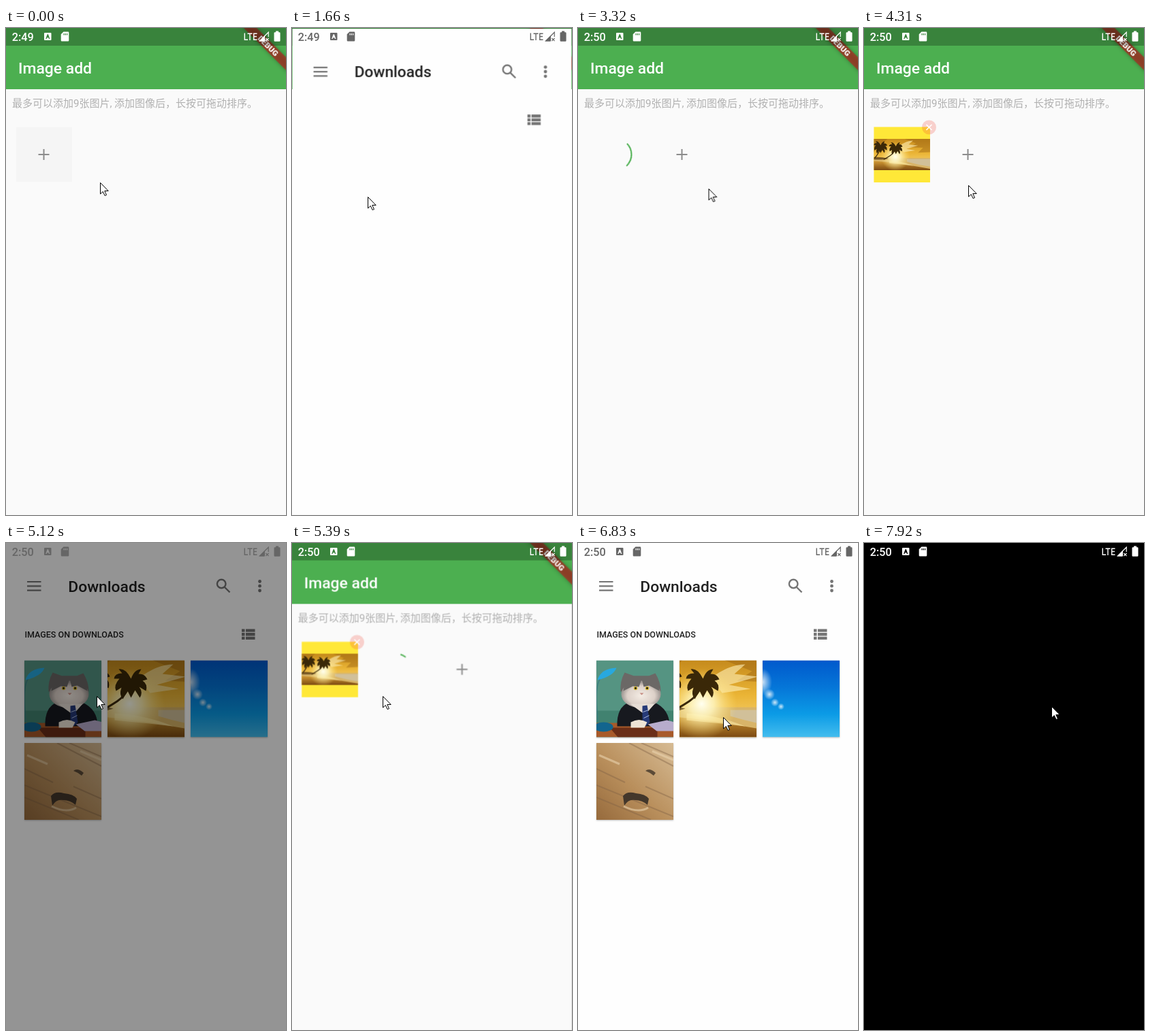
Write an HTML page that moves like this. It is 411x716 px and loops after 8000 ms.

```html
<!DOCTYPE html>
<html lang="zh">
<head>
<meta charset="utf-8">
<title>Image add</title>
<style>
  html, body { margin: 0; width: 100%; height: 100%; overflow: hidden; background: #000; }
  svg#stage { display: block; width: 411px; height: 716px; }
  text { font-family: Roboto, "Noto Sans CJK SC", "Noto Sans CJK", sans-serif; }
  .medium { font-weight: 500; }
  #home, #picker { transform-origin: 205.5px 358px; }
  .line { fill: none; stroke: currentColor; }
  #ribbon { filter: drop-shadow(0 0 3px rgba(0, 0, 0, .45)); }
  .thumb { filter: drop-shadow(0 1px 1px rgba(0, 0, 0, .25)); }
</style>
</head>
<body>
<svg id="stage" viewBox="0 0 411 716">
  <defs>
    <linearGradient id="dusk" x1="0" y1="0" x2="0" y2="1">
      <stop offset="0" stop-color="#c58a1c"/><stop offset=".45" stop-color="#eab435"/><stop offset="1" stop-color="#f9dd8a"/>
    </linearGradient>
    <linearGradient id="beach" x1="0" y1="0" x2="0" y2="1">
      <stop offset="0" stop-color="#d29a34"/><stop offset="1" stop-color="#7c4a12"/>
    </linearGradient>
    <radialGradient id="glow">
      <stop offset="0" stop-color="#fffff0"/><stop offset=".35" stop-color="#fff6c0" stop-opacity=".85"/>
      <stop offset="1" stop-color="#ffe070" stop-opacity="0"/>
    </radialGradient>
    <linearGradient id="sky" x1="0" y1="0" x2="0" y2="1">
      <stop offset="0" stop-color="#0059cc"/><stop offset=".35" stop-color="#0576d8"/>
      <stop offset=".7" stop-color="#0b9be6"/><stop offset="1" stop-color="#44bdee"/>
    </linearGradient>
    <radialGradient id="cloud">
      <stop offset="0" stop-color="#fff" stop-opacity=".8"/><stop offset="1" stop-color="#fff" stop-opacity="0"/>
    </radialGradient>
    <radialGradient id="fur" cy=".55">
      <stop offset="0" stop-color="#f4ece4"/><stop offset=".7" stop-color="#dcd0c8"/><stop offset="1" stop-color="#9d9692"/>
    </radialGradient>
    <linearGradient id="sand" x1="0" y1="1" x2="1" y2="0">
      <stop offset="0" stop-color="#966a3c"/><stop offset=".45" stop-color="#b98f5c"/><stop offset="1" stop-color="#d6bb94"/>
    </linearGradient>

    <path id="crown" fill="#3a2808" d="M0-6Q-8-22-18-20L-13-14Q-24-14-25-6L-17-6Q-26 4-22 12L-14 7Q-18 18-12 24L-5 12 0 22 6 11 13 22Q18 14 12 6L22 12Q25 2 17-3L24-5Q20-14 11-13L15-20Q5-20 0-6Z"/>
    <symbol id="palm" viewBox="0 0 204 113" preserveAspectRatio="xMidYMid slice">
      <path fill="url(#dusk)" d="M0 0H204V113H0Z"/>
      <path fill="#9a6312" opacity=".45" d="M0 0H50L12 30 0 50ZM112 0H204V48L160 50 178 32 130 30 152 16Z"/>
      <path fill="#fff0b8" opacity=".6" d="M92 26Q118 6 142 6L126 20 160 24 118 36 150 42 108 48Z"/>
      <path fill="#d8b468" d="M0 69H204V113H0Z"/>
      <path fill="#cfc6ae" opacity=".7" d="M120 73H204V100Q160 94 120 82Z"/>
      <path fill="url(#beach)" d="M0 80Q60 84 110 92T204 108V113H0Z"/>
      <path fill="#fbe6a4" opacity=".6" d="M56 78Q100 80 142 97 100 92 56 88Z"/>
      <circle cx="78" cy="64" r="52" fill="url(#glow)"/>
      <path fill="none" stroke="#3b290a" stroke-width="3" d="M80 34Q72 52 60 60T36 74M26 30Q20 52 3 70"/>
      <use href="#crown" x="80" y="33"/>
      <use href="#crown" x="25" y="29"/>
      <path fill="#4a300c" opacity=".7" d="M0 66Q26 64 54 71L40 75H0Z"/>
    </symbol>

    <symbol id="cat" viewBox="0 0 170 113" preserveAspectRatio="xMidYMid slice">
      <path fill="#559482" d="M0 0H170V113H0Z"/>
      <path fill="#2f7260" d="M0 74H170V113H0Z" opacity=".5"/>
      <path fill="#a85a2a" d="M0 92H170V113H0Z"/>
      <path fill="#6b2e17" d="M48 99H118V113H60Z"/>
      <path fill="none" stroke="#3d7f80" stroke-width="1.500" d="M34 27Q25 40 31 90"/>
      <path fill="#28a8df" d="M30 29Q35 12 58 11 54 23 30 29Z"/>
      <ellipse cx="39" cy="98" rx="14" ry="7" fill="#12658e"/>
      <path fill="#17191f" d="M59 97Q58 69 76 62H114Q136 72 136 97Z"/>
      <path fill="#6b6866" d="M64 46Q63 30 70 18L84 23H105L115 19Q123 32 123 46Z"/>
      <ellipse cx="94" cy="50" rx="29" ry="20" fill="url(#fur)"/>
      <path fill="#6b6866" d="M68 45Q70 27 84 23H106Q119 28 121 45L106 37 98 39 95 27 91 39 82 38Z"/>
      <path fill="#e6ddd5" d="M78 64H114L100 80Z"/>
      <g fill="#d4b62f"><circle cx="86" cy="41" r="2.800"/><circle cx="103" cy="41" r="2.800"/></g>
      <g fill="#16140e"><circle cx="86" cy="41" r="1.400"/><circle cx="103" cy="41" r="1.400"/></g>
      <path fill="#c68d83" d="M92 48H98L95 51Z"/>
      <path fill="#263a78" d="M96 67L103 66 107 91 101 97 96 88Z"/>
      <path stroke="#a9badc" d="M97 76L105 73M98 85L106 81"/>
      <path fill="#eee4d6" d="M79 91Q91 84 103 91L99 99H79Z"/>
      <path fill="#b7accc" d="M104 94L132 88 170 98V104L117 104Z"/>
    </symbol>

    <symbol id="blue" viewBox="0 0 113 113">
      <path fill="url(#sky)" d="M0 0H113V113H0Z"/>
      <g fill="url(#cloud)">
        <ellipse cx="0" cy="32" rx="14" ry="20"/><circle cx="10" cy="50" r="8"/>
        <circle cx="18" cy="62" r="6"/><circle cx="27" cy="68" r="5"/>
      </g>
    </symbol>

    <symbol id="steps" viewBox="0 0 113 113">
      <path fill="url(#sand)" d="M0 0H113V113H0Z"/>
      <path fill="none" stroke="#7d6044" stroke-width="2" opacity=".4" d="M0 62L113 108M0 80L80 113M48 0L113 34M66 0L113 20M0 38L42 58M72 64L113 82"/>
      <path fill="none" stroke="#e9d3ae" opacity=".6" stroke-width="3" d="M40 93Q62 104 76 95M4 18L34 31M82 12L113 25"/>
      <path fill="#43372b" d="M39 78Q45 70 58 74 72 75 77 82L75 91Q67 84 57 84 47 82 41 92Z"/>
      <path fill="#5c4b37" d="M72 41Q78 36 87 44L84 48Q78 43 72 41Z"/>
    </symbol>

    <g id="badge">
      <circle cx="95.500" cy="146" r="10.500" fill="#f44336" fill-opacity=".23"/>
      <path class="line" color="#fff" stroke-width="1.600" d="M91.500 142L99.500 150M99.500 142L91.500 150"/>
    </g>
    <path id="yellow" fill="#ffe838" d="M14.500 145.500H97V227H14.500Z"/>
  </defs>

  <path d="M0 0H411V716H0Z"/>

  <g id="home">
    <path fill="#fafafa" d="M0 0H411V716H0Z"/>
    <path fill="#4caf50" d="M0 0H411V90H0Z"/>
    <text class="medium" x="18" y="66.700" font-size="22.900" fill="#fff">Image add</text>
    <text x="9" y="116.300" font-size="15" fill="#b0b0b0">最多可以添加9张图片, 添加图像后，长按可拖动排序。</text>
    <path id="addTile" fill="#f5f5f5" d="M15 146H97V226H15Z"/>
    <path id="plus" class="line" color="#8c8c8c" stroke-width="2" d="M47.500 186H63.500M55.500 178V194"/>
    <g id="first">
      <use href="#yellow"/>
      <use href="#palm" x="14.500" y="163" width="82.500" height="46"/>
      <use href="#badge"/>
    </g>
    <g id="second" transform="translate(97 0)">
      <use href="#yellow"/>
      <use href="#cat" x="14.500" y="158.500" width="82.500" height="55"/>
      <use href="#badge"/>
    </g>
    <g id="spinSlot">
      <g transform="translate(55.500 186)">
        <circle id="spinner" class="line" color="#4caf50" r="23" stroke-width="2" pathLength="100"/>
      </g>
    </g>
    <g transform="translate(384.750 26.250) rotate(45)">
      <path id="ribbon" fill="#b71c1c" fill-opacity=".66" d="M-65-6.800H65V6.800H-65Z"/>
      <text y="4.200" font-size="11.600" font-weight="900" text-anchor="middle" fill="#fff">DEBUG</text>
    </g>
    <path fill-opacity=".25" d="M0 0H411V26H0Z"/>
  </g>

  <g id="picker" color="#757575">
    <path fill="#fefefe" d="M0 0H411V716H0Z"/>
    <path class="line" stroke-width="2.200" d="M31 57H51.500M31 63.300H51.500M31 69.600H51.500"/>
    <text class="medium" x="91.300" y="71.500" font-size="22.800" fill="#222">Downloads</text>
    <path class="line" stroke-width="2.400" d="M322.500 60A6.300 6.300 0 1 0 309.900 60 6.300 6.300 0 1 0 322.500 60M320.500 64.500L328.500 72.500"/>
    <g fill="currentColor">
      <circle cx="372.500" cy="56.500" r="2.400"/><circle cx="372.500" cy="63.200" r="2.400"/><circle cx="372.500" cy="70" r="2.400"/>
      <path d="M346 126.500h4.500v4.300h-4.500zm6 0h13.500v4.300H352zm-6 5.600h4.500v4.300h-4.500zm6 0h13.500v4.300H352zm-6 5.600h4.500v4.300h-4.500zm6 0h13.500v4.300H352z"/>
    </g>
    <g id="gallery">
      <text class="medium" x="27.500" y="138.700" font-size="12.500" fill="#222">IMAGES ON DOWNLOADS</text>
      <use class="thumb" href="#cat" x="27" y="172.500" width="113" height="113"/>
      <use class="thumb" href="#palm" x="149" y="172.500" width="113" height="113"/>
      <use class="thumb" href="#blue" x="271" y="172.500" width="113" height="113"/>
      <use class="thumb" href="#steps" x="27" y="294" width="113" height="113"/>
    </g>
  </g>

  <g id="status" fill="currentColor">
    <g class="medium" font-size="16.300">
      <text id="before" x="8.700" y="18.500">2:49</text>
      <text id="after" x="8.700" y="18.500">2:50</text>
    </g>
    <path fill-rule="evenodd" d="M57 7h8.500q1 0 1 1v9q0 1-1 1H57q-1 0-1-1V8q0-1 1-1zM58.200 16h1.400l.6-1.700h2.200l.6 1.700h1.400l-2.400-6.800h-1.400z"/>
    <path fill-rule="evenodd" d="M84.500 5.500H91q1.300 0 1.300 1.300V18.200q0 1.300-1.300 1.300H82q-1.300 0-1.300-1.300V9.300zM84.500 8v2.500h1.200V8zm2.300 0v2.500H88V8zm2.300 0v2.500h1.200V8z"/>
    <path class="line" stroke-width="1.400" d="M350.300 7.500V17.300H355M354.500 8.200H361.500M358 8.200V18M368.500 8.200H363.700V17.300H368.500M363.700 12.500H368"/>
    <path d="M371.500 19.500L380 11V19.500Z"/>
    <path class="line" stroke-width="1.200" d="M379 19H372.500L385.200 6.300V13M381.300 15L385.500 19.200M385.500 15L381.300 19.200"/>
    <path d="M396 4.500h4v1.700h1.300q1.200 0 1.200 1.200V18.500q0 1.200-1.200 1.200h-6.600q-1.200 0-1.200-1.200V7.400q0-1.200 1.200-1.200H396z"/>
  </g>

  <g id="cursor">
    <path transform="translate(.5 .5)" fill="#fff" stroke="#000" d="M0 0V16.500L3.800 13 6.600 19 9 18 6.300 12H11.700Z"/>
  </g>
</svg>

<script>
const LOOP = 8000;
const HOLD = 'step-end';
const SETTLE = 'cubic-bezier(.05,.7,.1,1)';

// rows: [ms, properties, easing towards the next row]
function play(id, rows) {
  const frames = rows.map(([ms, props, easing = 'linear']) => ({ ...props, easing, offset: ms / LOOP }));
  frames.push({ ...rows.at(-1)[1], offset: 1 });
  document.getElementById(id).animate(frames, { duration: LOOP, iterations: Infinity });
}

const move = (x, y = 0) => ({ transform: `translate(${x}px, ${y}px)` });
const scale = s => ({ transform: `scale(${s})` });
const switches = (id, rows) => play(id, rows.map(([ms, on]) => [ms, { opacity: on }, HOLD]));
const slots = (id, rows) => play(id, rows.map(([ms, slot]) => [ms, move(slot * 97), HOLD]));

const visits = [ // picker opens, shows its images, is left
  { open: 1480, load: 1840, leave: 2380 },
  { open: 4400, load: 4530, leave: 5030 },
  { open: 6550, load: 6640, leave: 7470 },
];
const returns = [3050, 5210];

const fade = [[0, { opacity: 0 }]];
const zoom = [[0, scale(.85), HOLD]];
const gallery = [[0, 0]];
const tint = [[0, { color: '#fff' }, HOLD]];
for (const { open, load, leave } of visits) {
  const gone = leave + 220;
  fade.push([open, { opacity: 0 }], [open + 90, { opacity: 1 }], [leave, { opacity: 1 }], [gone, { opacity: 0 }]);
  zoom.push([open, scale(.85), SETTLE], [open + 280, scale(1), HOLD], [gone, scale(.85), HOLD]);
  gallery.push([load, 1], [gone, 0]);
  tint.push([open + 90, { color: '#666' }, HOLD], [leave + 130, { color: '#fff' }, HOLD]);
}
play('picker', fade);
play('picker', zoom);
switches('gallery', gallery);
play('status', tint);

switches('home', [[0, 1], [2380, 0], [3050, 1], [5030, 0], [5210, 1], [7470, 0]]);
play('home', [[0, scale(1), HOLD],
  ...returns.flatMap(ms => [[ms, scale(1.06), SETTLE], [ms + 280, scale(1), HOLD]])]);

switches('before', [[0, 1], [3140, 0]]);
switches('after', [[0, 0], [3140, 1]]);
switches('addTile', [[0, 1], [2400, 0]]);
slots('plus', [[0, 0], [3050, 1], [5200, 2]]);
switches('first', [[0, 0], [3600, 1]]);
switches('second', [[0, 0], [5930, 1]]);

// loading arc: grows while it turns
const spins = returns.map(ms => ms + 80);
switches('spinSlot', [[0, 0], [spins[0], 1], [3600, 0], [spins[1], 1], [5930, 0]]);
slots('spinSlot', [[0, 0], [5000, 1]]);
const arc = (part, turn) => ({ strokeDasharray: `${part} ${100 - part}`, transform: `rotate(${turn}deg)` });
const grow = [[0, arc(1, -90), HOLD]];
for (const ms of spins) {
  grow.push([ms, arc(1, -80), 'cubic-bezier(.4,0,.2,1)'], [ms + 667, arc(75, 28), HOLD]);
}
play('spinner', grow);

play('cursor', [
  [0, 138, 227], [90, 138, 227], [360, 63, 193], [1000, 63, 193],
  [1570, 111, 248], [1750, 111, 248], [2200, 203, 246], [3140, 203, 246],
  [3700, 150, 200], [4040, 150, 200], [4270, 153, 231], [4400, 153, 231],
  [4750, 133, 225], [5430, 133, 225], [5750, 225, 208], [6200, 254, 200],
  [6560, 254, 200], [6830, 213, 256], [6900, 213, 256], [7190, 275, 240],
].map(([ms, x, y]) => [ms, move(x, y), 'ease-in-out']));
</script>
</body>
</html>
```
